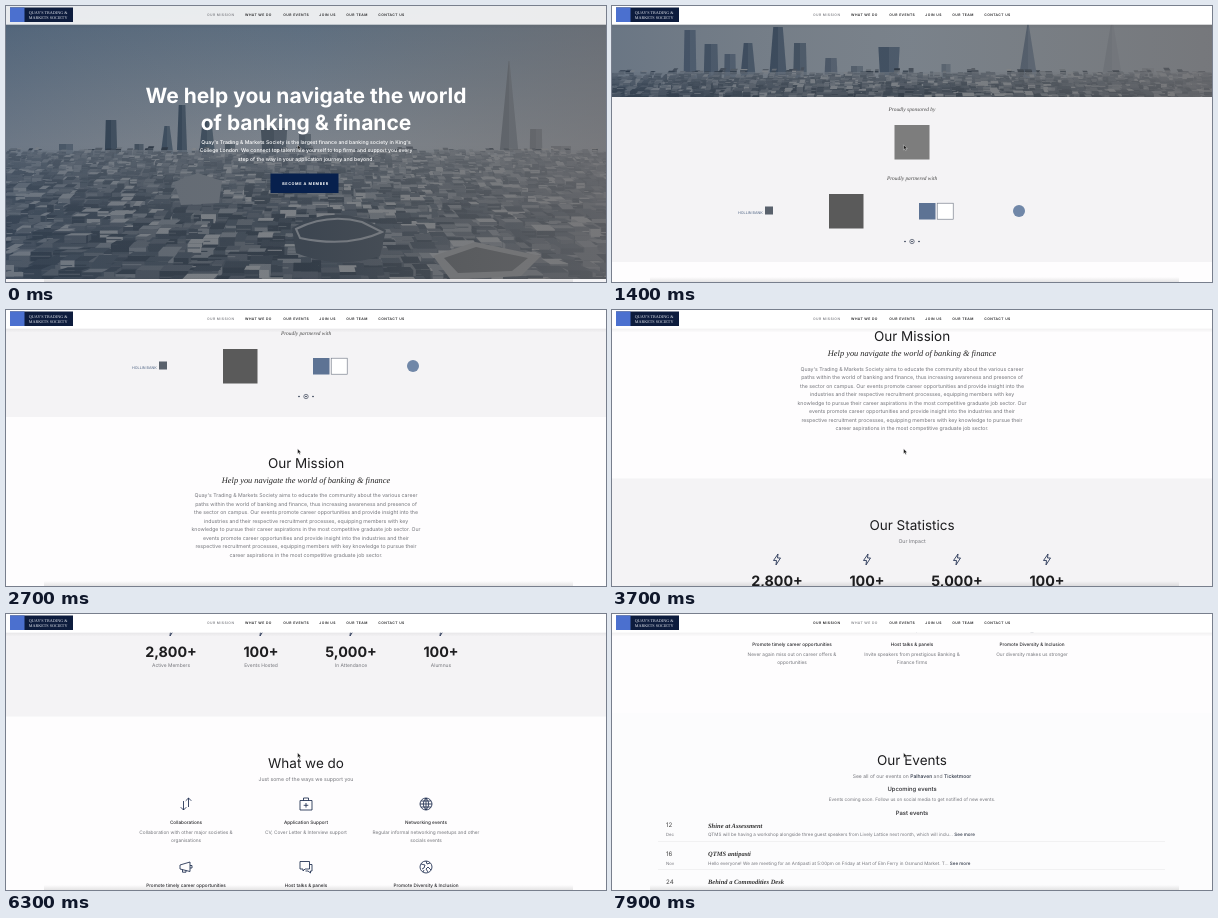
Recreate the animation shown at these times as an HTML page. Size 600 px wide and 276 px high, loop 8000 ms.

```html
<!DOCTYPE html>
<html lang="en">
<head>
<meta charset="utf-8">
<title>Society home page</title>
<style>
  html, body { margin: 0; width: 100%; height: 100%; overflow: hidden; background: #fefdfe; }
  svg { display: block; width: 100vw; height: 100vh; }
  text { font-family: Inter, sans-serif; text-rendering: geometricPrecision; white-space: pre; }
  .serif { font-family: "Liberation Serif", serif; }
  .italic { font-style: italic; }
  .icon { fill: none; stroke: #1c2b4d; stroke-width: .85; stroke-linejoin: round; }
</style>
</head>
<body>
<svg id="stage" viewBox="0 0 600 276">
  <defs>
    <linearGradient id="sky" x2="0" y2="1">
      <stop offset="0" stop-color="#566a7f"/><stop offset=".5" stop-color="#7d858f"/><stop offset="1" stop-color="#70757d"/>
    </linearGradient>
    <linearGradient id="sunlight">
      <stop offset="0" stop-color="#3a4f69" stop-opacity=".25"/><stop offset=".5" stop-color="#77746f" stop-opacity=".08"/>
      <stop offset="1" stop-color="#737070" stop-opacity=".6"/>
    </linearGradient>
    <linearGradient id="haze" x2="0" y2="1">
      <stop offset="0" stop-color="#757d87" stop-opacity=".55"/><stop offset=".35" stop-color="#5b636d" stop-opacity=".2"/>
      <stop offset="1" stop-color="#39424e" stop-opacity=".1"/>
    </linearGradient>
    <linearGradient id="under" x2="0" y2="1">
      <stop offset="0" stop-opacity=".05"/><stop offset="1" stop-opacity="0"/>
    </linearGradient>
    <linearGradient id="over" x2="0" y2="1">
      <stop offset="0" stop-opacity="0"/><stop offset="1" stop-opacity=".1"/>
    </linearGradient>
    <clipPath id="heroBox"><rect width="600" height="273"/></clipPath>
  </defs>
</svg>
<script>
const stage = document.getElementById('stage');
const NAVY = '#07204d', INK = '#1d1d1f', GREY = '#74757b';

function add(parent, tag, attrs = {}, content) {
  const node = document.createElementNS('http://www.w3.org/2000/svg', tag);
  for (const key in attrs) node.setAttribute(key, attrs[key]);
  if (content) node.textContent = content;
  parent.appendChild(node);
  return node;
}
const box = (parent, x, y, width, height, fill, more) =>
  add(parent, 'rect', { x, y, width, height, fill, ...more });
const shape = (parent, d, fill, more) => add(parent, 'path', { d, fill, ...more });

// y is the middle of the capital letters
const label = (parent, content, x, y, size, fill = GREY, more) =>
  add(parent, 'text', { x, y: y + size * .36, 'font-size': size, fill, 'text-anchor': 'middle', ...more }, content);
const leftLabel = (parent, content, x, y, size, fill, more) =>
  label(parent, content, x, y, size, fill, { 'text-anchor': 'start', ...more });
const lines = (parent, rows, x, y, step, size, fill, more) =>
  rows.forEach((row, i) => label(parent, row, x, y + i * step, size, fill, more));
const heading = (content, y) => label(page, content, 300, y, 13.5, INK);
const icon = (d, x, y) => add(page, 'path', { d, class: 'icon', transform: `translate(${x} ${y})` });

let seed = 11;
const random = () => (seed = seed * 16807 % 2147483647) / 2147483647;
const between = (a, b) => a + (b - a) * random();

// Each tower: centre, width, top, width of the roof as a share of the base, colour
function towers(parent, list, base) {
  for (const [x, w, top, roof, fill] of list) {
    const r = w * roof / 2;
    shape(parent, `M${x - w / 2} ${base}L${x - r} ${top}H${x + r}L${x + w / 2} ${base}Z`, fill);
    shape(parent, `M${x} ${base}V${top}H${x + r}L${x + w / 2} ${base}Z`, '#a4acb5', { opacity: .12 });
  }
}

// Rows of blocks that grow towards the viewer; the rows lean outwards from the middle
function city(parent, horizon, bottom) {
  const tones = ['#27323f', '#303b48', '#394451', '#444d59', '#525a64', '#656c75', '#84888d'];
  const tone = bias => tones[Math.floor(random() ** bias * tones.length)];
  box(parent, 0, horizon, 600, bottom - horizon, '#3d4753');
  for (let y = horizon - 4; y < bottom; ) {
    const depth = (y - horizon + 4) / 130;
    for (let x = between(-25, -15); x < 610; ) {
      const w = between(3, 7) + depth * between(4, 26);
      const h = between(2, 6) + depth * between(3, 12);
      const top = y + between(-4, 4);
      const slant = (300 - x) / 300 * (2 + depth * 10), roof = h * between(.3, .6);
      box(parent, x, top, w, h, tone(1.5));
      shape(parent, `M${x} ${top}l${slant} ${-roof}h${w}l${-slant} ${roof}Z`, tone(1));
      box(parent, x, top + h * .4, w * between(.3, 1), .6 + depth * .6, tone(.9));
      x += w * between(.8, 1.2);
    }
    y += 3 + depth * 7;
  }
  box(parent, 0, horizon - 6, 600, bottom - horizon + 6, 'url(#haze)');
}

const page = add(stage, 'g');

// Hero
const hero = add(page, 'g', { 'clip-path': 'url(#heroBox)' });
const wideView = add(hero, 'g');
box(wideView, 0, 0, 600, 276, 'url(#sky)');
towers(wideView, [
  [60, 14, 138, 1, '#4b5866'], [105, 13, 114, .8, '#2f3f50'], [133, 9, 138, 1, '#3f4c5a'],
  [161, 15, 120, .35, '#394a5c'], [176, 11, 99, .6, '#324355'], [201, 18, 115, .5, '#3a4a5b'],
  [224, 10, 138, 1, '#47535f'], [268, 22, 122, 1.2, '#414d5a'], [299, 12, 128, 1, '#4b5662'],
  [503, 21, 55, .04, '#515b67'], [530, 13, 123, .9, '#555d67'], [555, 20, 140, 1, '#5c636d'],
], 158);
city(wideView, 150, 330);
shape(wideView, 'M168 176l24-9 24 8-3 22-38 2Z', '#666d76');
shape(wideView, 'M286 222q30-20 70-10l24 12-6 26q-42 14-84-3Z', '#38424e');
shape(wideView, 'M290 223q32-16 66-7l20 10q-35 16-82 6Z', 'none', { stroke: '#747a82', 'stroke-width': 2 });
shape(wideView, 'M427 250l42-14 66 14-20 20-70 4Z', '#72767b');
shape(wideView, 'M438 252l32-11 52 11-16 13-54 2Z', '#4b5056');

const closeView = add(hero, 'g');
box(closeView, 0, 0, 600, 276, '#7a838d');
towers(closeView, [
  [78, 13, 24, .85, '#445265'], [99, 15, 38, .85, '#3f4e60'], [118, 12, 48, .9, '#465466'],
  [136, 17, 37, .5, '#3a495c'], [166, 19, 21, .5, '#37475a'], [188, 14, 37, .85, '#3f4e5f'],
  [219, 14, 52, .8, '#485566'], [245, 12, 60, 1, '#515d6b'], [277, 17, 41, 1.25, '#3d4d60'],
  [334, 9, 58, 1, '#566270'], [416, 21, 18, .06, '#48576a'], [500, 23, 18, .1, '#6b747f'],
  [536, 12, 62, 1, '#6a727c'],
], 80);
city(closeView, 72, 130);
box(hero, 0, 0, 600, 273, 'url(#sunlight)');

lines(page, ['We help you navigate the world', 'of banking & finance'], 300, 89.5, 26.5, 21, '#fff', { 'font-weight': 700 });
lines(page, [
  "Quay's Trading & Markets Society is the largest finance and banking society in King's",
  'College London. We connect top talent like yourself to top firms and support you every',
  'step of the way in your application journey and beyond.',
], 300, 136, 8.6, 5.15, '#fff', { 'font-weight': 500 });
box(page, 264.5, 167.5, 68, 19.5, NAVY);
label(page, 'BECOME A MEMBER', 299.5, 177.2, 3.8, '#fff', { 'font-weight': 700, 'letter-spacing': .6 });

// Sponsors
box(page, 0, 273, 600, 165, '#f4f3f5');
const serifItalic = { class: 'serif italic' };
label(page, 'Proudly sponsored by', 300, 285, 5.4, '#444', serifItalic);
box(page, 282.5, 301, 35, 34.5, '#7d7d7d');
label(page, 'Proudly partnered with', 300, 354, 5.4, '#444', serifItalic);
box(page, 153, 382.5, 8, 8, '#59616c');
leftLabel(page, 'HOLLIN BANK', 126, 388.3, 3.7, '#667894', { 'font-weight': 500 });
box(page, 217, 370, 34.5, 34.5, '#5a5a5a');
box(page, 307, 379, 16.5, 16.5, '#5d7394');
box(page, 325.2, 379.2, 16, 16, '#fff', { stroke: '#68717f', 'stroke-width': .6 });
add(page, 'circle', { cx: 407, cy: 387, r: 6, fill: '#7087a8' });
for (const cx of [293, 300, 307]) add(page, 'circle', { cx, cy: 417.5, r: .8, fill: '#253047' });
add(page, 'circle', { cx: 300, cy: 417.5, r: 2.2, fill: 'none', stroke: '#253047', 'stroke-width': .6 });

// Mission
heading('Our Mission', 484);
label(page, 'Help you navigate the world of banking & finance', 300, 501, 8.4, '#222', serifItalic);
lines(page, [
  "Quay's Trading & Markets Society aims to educate the community about the various career",
  'paths within the world of banking and finance, thus increasing awareness and presence of',
  'the sector on campus. Our events promote career opportunities and provide insight into the',
  'industries and their respective recruitment processes, equipping members with key',
  'knowledge to pursue their career aspirations in the most competitive graduate job sector. Our',
  'events promote career opportunities and provide insight into the industries and their',
  'respective recruitment processes, equipping members with key knowledge to pursue their',
  'career aspirations in the most competitive graduate job sector.',
], 300, 516.5, 8.5, 5.2);

// Statistics
box(page, 0, 626, 600, 167, '#f4f3f5');
heading('Our Statistics', 672.5);
label(page, 'Our Impact', 300, 689, 5.2);
[['2,800+', 'Active Members'], ['100+', 'Events Hosted'], ['5,000+', 'In Attendance'], ['100+', 'Alumnus']]
  .forEach(([count, name], i) => {
    const x = 165 + 90 * i;
    icon('M1-5.5L-3.5 1H-.5L-1 5.5 3.5-1.5H.5L1-5.5Z', x, 707);
    label(page, count, x, 728, 14.3, INK, { 'font-weight': 700 });
    label(page, name, x, 741.8, 4.95);
  });

// Services
heading('What we do', 839.5);
label(page, 'Just some of the ways we support you', 300, 855.5, 5.2);
const globe = 'M-6 0a6 6 0 1 0 12 0a6 6 0 1 0-12 0Z';
[
  ['Collaborations', ['Collaboration with other major societies &', 'organisations'],
    'M2.5 3V-6M-.3-3.2L2.5-6 5.3-3.2M-2.5-3V6M-5.3 3.2L-2.5 6 .3 3.2'],
  ['Application Support', ['CV, Cover Letter & Interview support'],
    'M-6-3.5H6V6H-6ZM-2.5-3.5V-6H2.5V-3.5M0-1V3.6M-2.3 1.3H2.3'],
  ['Networking events', ['Regular informal networking meetups and other', 'socials events'],
    globe + 'M-6 0H6M0-6V6M-5-3H5M-5 3H5M0-6Q-5.5 0 0 6M0-6Q5.5 0 0 6'],
  ['Promote timely career opportunities', ['Never again miss out on career offers &', 'opportunities'],
    'M-6-2L4-5V4.5L-6 2ZM-3.5 2.6V5.2H0V3.5M4-1.5H6V1H4'],
  ['Host talks & panels', ['Invite speakers from prestigious Banking &', 'Finance firms'],
    'M-6-5.5H3.5V2H-1L-3 4V2H-6ZM3.5-2.5H6V4H4.5V6L2 4H-.5'],
  ['Promote Diversity & Inclusion', ['Our diversity makes us stronger'],
    globe + 'M-5-3L-1-2-2 1-4 2M0-6L1-3 4-4M5 3L2 0 0 2 2 5M-3 5L-2 3'],
].forEach(([name, text, path], i) => {
  const x = 180 + i % 3 * 120, y = 880.5 + Math.floor(i / 3) * 63;
  icon(path, x, y);
  label(page, name, x, y + 18, 4.65, '#26262a', { 'font-weight': 500 });
  lines(page, text, x, y + 28.6, 7.9, 4.75);
});

// Events
box(page, 0, 1031, 600, 260, '#fcfcfd');
heading('Our Events', 1077.5);
const links = label(page, 'See all of our events on ', 300, 1093.5, 5.05);
const strong = { fill: '#2c3444', 'font-weight': 500 };
add(links, 'tspan', strong, 'Palhaven');
add(links, 'tspan', {}, ' and ');
add(links, 'tspan', strong, 'Ticketmoor');
label(page, 'Upcoming events', 300, 1106.7, 5.9, '#26262a', { 'font-weight': 500 });
label(page, 'Events coming soon. Follow us on social media to get notified of new events.', 300, 1117.3, 4.6);
label(page, 'Past events', 300, 1130, 5.9, '#26262a', { 'font-weight': 500 });
[
  ['12', 'Dec', 'Shine at Assessment', 'QTMS will be having a workshop alongside three guest speakers from Lively Lattice next month, which will inclu... '],
  ['16', 'Nov', 'QTMS antipasti', 'Hello everyone! We are meeting for an Antipasti at 5:00pm on Friday at Hart of Elm Ferry in Osmund Market. T... '],
  ['24', '', 'Behind a Commodities Desk', ''],
].forEach(([day, month, title, text], i) => {
  const y = 1142.7 + 28.4 * i;
  leftLabel(page, day, 54, y, 6.2, '#444');
  leftLabel(page, title, 96, y, 6.5, '#333', { class: 'serif italic', 'font-weight': 700 });
  if (!text) return;
  leftLabel(page, month, 54, y + 9.4, 4.3);
  add(leftLabel(page, text, 96, y + 9.4, 4.57), 'tspan', strong, 'See more');
  box(page, 46, y + 15.8, 507, .5, '#e4e4e6');
});

// Fixed header, lower shade and pointer
const header = box(stage, 0, 0, 600, 18.7, '#fff');
box(stage, 0, 18.7, 600, 4, 'url(#under)');
box(stage, 4, 1.5, 63, 14.5, '#0d1c3d');
box(stage, 4, 1.5, 14.5, 14.5, '#4b70cf');
leftLabel(stage, "QUAY'S TRADING &", 22.7, 6.6, 4.2, '#e8ebf2', { class: 'serif' });
leftLabel(stage, 'MARKETS SOCIETY', 22.7, 11.4, 4.2, '#e8ebf2', { class: 'serif' });
const navigation = [['OUR MISSION', 201], ['WHAT WE DO', 239], ['OUR EVENTS', 277.3], ['JOIN US', 313.3], ['OUR TEAM', 340.3], ['CONTACT US', 372.3]]
  .map(([name, x]) => leftLabel(stage, name, x, 9.2, 3.4, INK, { 'font-weight': 600, 'letter-spacing': .42 }));
box(stage, 38, 271, 529, 5, 'url(#over)');
shape(stage, 'M291.6 138.8v5l1.1-1 .8 1.8.9-.4-.8-1.7h1.6Z', '#111', { stroke: '#fff', 'stroke-width': .4 });

// Scroll bursts: start time, number of 100 ms steps, resting position
const bursts = [
  [100, 4, 50], [600, 5, 140], [1200, 3, 182], [1800, 3, 240], [2400, 4, 331], [3000, 4, 448],
  [3700, 4, 509], [4500, 2, 575.8], [5100, 5, 640], [5900, 5, 690.5], [6600, 8, 850], [7700, 3, 931.5],
];
function scrollAt(time) {
  const tick = Math.floor(time / 100);
  let position = 0, rest = 0;
  for (const [start, steps, end] of bursts) {
    const k = Math.min(1, Math.max(0, (tick - start / 100 + 1) / steps));
    position += (end - rest) * k * k * (3 - 2 * k);
    rest = end;
  }
  return position;
}

function draw(now) {
  const scroll = scrollAt(now % 8000);
  page.setAttribute('transform', `translate(0 ${-scroll})`);
  wideView.setAttribute('transform', `translate(0 ${scroll * .7})`);
  closeView.setAttribute('transform', `translate(0 ${182 + (scroll - 182) * .7})`);
  closeView.setAttribute('opacity', Math.min(1, Math.max(0, (scroll - 50) / 120)));
  header.setAttribute('opacity', scroll ? 1 : .87);
  const active = scroll > 774 ? 1 : 0;
  navigation.forEach((link, i) => link.setAttribute('fill', i === active ? '#85868b' : INK));
  requestAnimationFrame(draw);
}
draw(performance.now());
</script>
</body>
</html>
```
